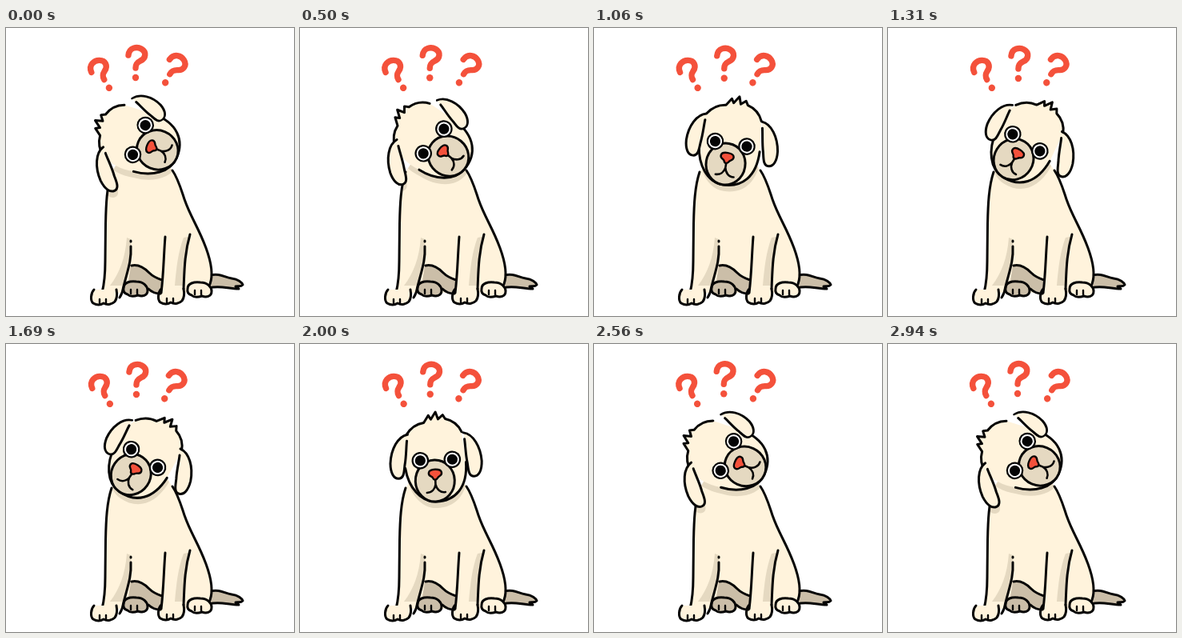
An HTML page with a canvas that plays this animation: 360 by 360 pixels, repeating every 3000 ms.

```html
<!DOCTYPE html>
<html lang="en">
<head>
<meta charset="utf-8">
<title>Puzzled dog</title>
<style>
  html, body { margin: 0; width: 100%; height: 100%; overflow: hidden; background: #fff; }
  canvas { display: block; width: 360px; height: 360px; }
</style>
</head>
<body>
<canvas id="stage"></canvas>
<script>
const INK = '#050505', CREAM = '#fff3dc', SHADE = '#e5d9c1', DARK = '#cbbea8', RED = '#f4513b';
const LOOP = 3000, STEPS = 48;
const HELD = new Set([1, 15, 19, 24, 28, 33, 37, 46]); // steps that repeat the one before
const TILT_LEFT = -67, TILT_RIGHT = 37;

const canvas = document.getElementById('stage');
const ratio = window.devicePixelRatio || 1;
canvas.width = canvas.height = 360 * ratio;
const ctx = canvas.getContext('2d');
ctx.scale(ratio, ratio);
ctx.lineCap = ctx.lineJoin = 'round';

const svg = d => new Path2D(d);

// Body, in stage coordinates
const LEFT_SIDE = '132 180C126 198 125 220 124.5 245L124 292C124 309 122 323 120 331';
const BACK = '208 178C215 188 218 199 223 214C231 237 240 248 250 275C257 294 259 309 255 320';
const BODY = svg(`M${LEFT_SIDE}L254 331L255 320L250 275L223 214L208 178L195 160L145 160Z`);
const BACK_FILL = svg(`M${BACK}L208 320Z`);
const OUTLINE = svg(`M${LEFT_SIDE}M${BACK}`);
const TAIL = svg('M255 309C268 306 273 312 282 313C290 314 295 318 296 321C293 324 290 322 287 323L291 326C278 326 266 321 254 325Z');
const LEG_SHADES = svg('M151 262L156 264C156 290 152 303 147 322L130 322C142 306 149 288 151 262Z' +
  'M228 261C223 282 222 300 222 322L211 322C213 300 215 280 222 262Z');
const HAUNCH = svg('M156 297C166 295 174 301 180 308C185 313 190 314 195 315L194 331L152 322Z');
const LEG_LINES = svg('M156 266L156 267M156 273C157 291 152 303 147 323C146 330 144 334 142 337' +
  'M157 297C166 295 174 301 179 306C184 311 189 313 195 315M178 326C182 330 187 332 193 332' +
  'M199 261C197 287 197 307 194 331M230 258C223 282 223 304 222 326');
const FRONT_PAW = svg('M-13 -11C-17 -7 -18 3 -14 6C-9 9 -4 8 -1 6C4 9 10 7 13 4C16 0 16 -6 15 -11');
const HIND_PAW = svg('M-15 -1C-15 -8 -7 -10 1 -9C10 -9 15 -3 15 2C15 9 8 10 3 8C-3 10 -8 9 -10 7C-14 6 -16 3 -15 -1Z');
const TOES = svg('M-6 1L-6 6M2 1L2 6');

// Head, around the middle between the eyes
const TUFT = [0, 1, 2].map(i => `L${-8 + 9 * i} ${-60 + 4 * Math.abs(i - 1)}L${-5 + 9 * i} -51`).join('');
const TOP = `M-36 -33C-30 -42 -22 -46 -14 -47${TUFT}C21 -49 29 -43 33 -34`;
const JAW = '37 4C38 36 22 52 -2 52C-22 52 -36 32 -39 9';
const SKULL = svg(`${TOP}L${JAW}C-43 -8 -41 -22 -36 -33Z`);
const SKULL_LINE = svg(`${TOP}M${JAW}`);
const EAR = svg('M0 0C-12 2 -21 18 -22 36C-22 48 -18 55 -12 55C-5 55 -5 46 -4 38C-2 28 -2 16 -1 8');
const MUZZLE = new Path2D();
MUZZLE.ellipse(-2.5, 26, 24.5, 26, 0, 0, 7);
const NOSE = svg('M-8 -2C-7 -7 7 -7 8 -2C9 3 4 2 3 5C1 8 -2 8 -3 5C-4 2 -9 3 -8 -2Z');
const MOUTH = svg('M0 6L0 13C-1 19 -5 23 -11 23M0 13C1 19 6 24 12 23');

const HOOK = svg('M-10 -9C-9 -19 1 -20 6 -17C13 -13 12 -5 5 -2C1 0 -1 2 -1 7');

function paint(path, fill, line = INK, width = 3) {
  if (fill) { ctx.fillStyle = fill; ctx.fill(path); }
  if (line) { ctx.strokeStyle = line; ctx.lineWidth = width; ctx.stroke(path); }
}

function disc(x, y, r, color) {
  ctx.fillStyle = color;
  ctx.beginPath();
  ctx.arc(x, y, r, 0, 7);
  ctx.fill();
}

function at(x, y, angle, draw) {
  ctx.save();
  ctx.translate(x, y);
  ctx.rotate(angle);
  draw();
  ctx.restore();
}

function ease(time, from, to) {
  const k = Math.min(1, Math.max(0, (time - from) / (to - from)));
  return k * k * (3 - 2 * k);
}

function tiltAt(time) {
  const share = ease(time, 186, 1416) - ease(time, 1600, 2560);
  return (TILT_LEFT + (TILT_RIGHT - TILT_LEFT) * share) * Math.PI / 180;
}

function inHead(tilt, draw) {
  const s = Math.sin(tilt);
  at(170.5 + 4.5 * s, 145 - 6 * s * s, tilt, draw);
}

// Ears hang: they only partly follow the tilt, the raised one more than the other.
function ear(side, tilt, fill, line) {
  const raise = -side * tilt;
  const follow = raise > 0 ? .6 : .4;
  at(side * (35 + 8 * raise), -33 + 4 * raise, (follow - 1) * tilt, () => {
    ctx.scale(-side, 1 - .16 * Math.max(0, raise));
    paint(EAR, fill, line);
  });
}

function drawShadow(tilt) {
  ctx.save();
  ctx.clip(BODY);
  ctx.translate(1, 8);
  inHead(tilt, () => {
    paint(SKULL, SHADE, null);
    for (const side of [-1, 1]) ear(side, tilt, SHADE, null);
  });
  ctx.restore();
}

function paw(shape, x, y, fill = CREAM) {
  at(x, y, 0, () => { paint(shape, fill); paint(TOES, null, INK, 2.4); });
}

function drawBody(tilt) {
  paint(TAIL, DARK);
  paint(BODY, CREAM, null);
  paint(BACK_FILL, CREAM, null);
  paint(LEG_SHADES, SHADE, null);
  paint(HAUNCH, DARK, null);
  drawShadow(tilt);
  paint(OUTLINE);
  paw(HIND_PAW, 162, 326, DARK);
  paw(HIND_PAW, 242, 327);
  paw(FRONT_PAW, 123, 338);
  paw(FRONT_PAW, 207, 337);
  paint(LEG_LINES);
}

function drawHead(tilt) {
  paint(SKULL, CREAM, null);
  paint(SKULL_LINE);
  paint(MUZZLE, SHADE);
  for (const x of [-20, 20]) {
    disc(x, 0, 10.8, INK);
    disc(x, 0, 8.6, '#fff');
    disc(x, 0, 6.6, INK);
  }
  at(-2, 17.5, 0, () => { paint(MOUTH, null, INK, 2.6); paint(NOSE, RED, INK, 2.4); });
  for (const side of [-1, 1]) ear(side, tilt, CREAM);
}

function question(x, y, angle) {
  at(x, y, angle, () => {
    paint(HOOK, null, RED, 7.4);
    disc(-1, 19, 4.2, RED);
  });
}

function render(step) {
  const tilt = tiltAt(step / STEPS * LOOP);
  const sway = (1 + Math.cos(step / STEPS * 2 * Math.PI)) / 2;

  ctx.fillStyle = '#fff';
  ctx.fillRect(0, 0, 360, 360);
  question(121 - sway, 58, -.54);
  question(164 - sway, 44 - sway, 0);
  question(208 + sway, 52, .49);
  drawBody(tilt);
  inHead(tilt, () => drawHead(tilt));
}

let start = null, shown = -1;
function tick(now) {
  start ??= now;
  let step = Math.floor((now - start) % LOOP / LOOP * STEPS);
  if (HELD.has(step)) step--;
  if (step !== shown) render(shown = step);
  requestAnimationFrame(tick);
}
render(0);
requestAnimationFrame(tick);
</script>
</body>
</html>
```
